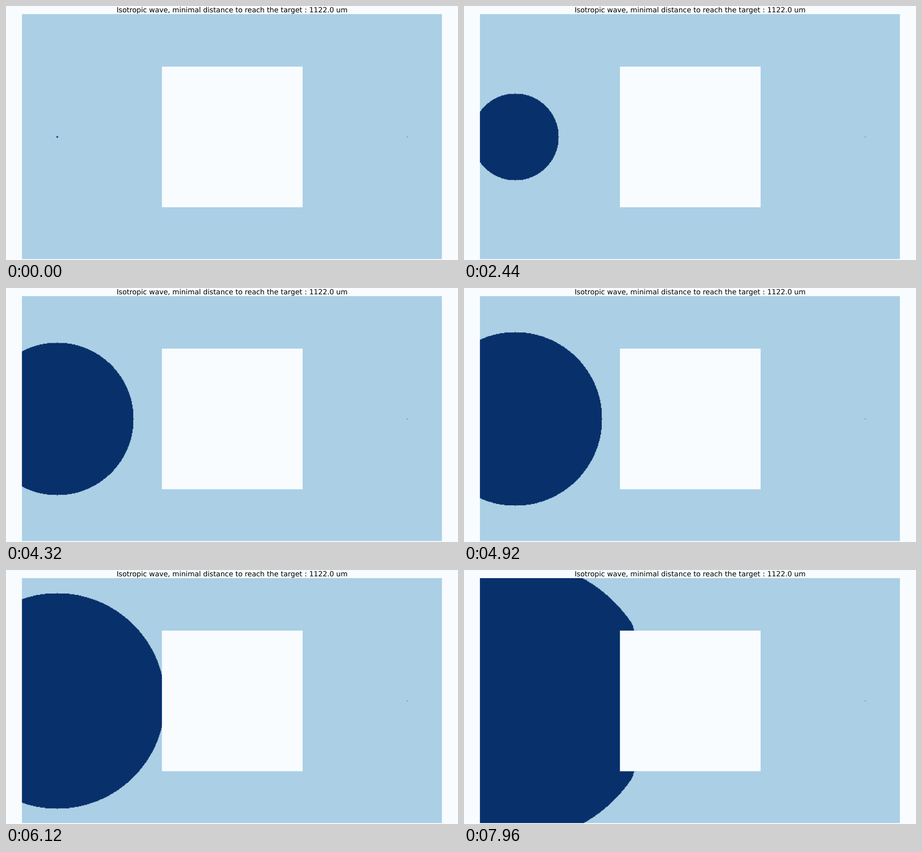
An HTML page for the animation above (8 s loop, 998 by 561 pixels).

```html
<!DOCTYPE html>
<html lang="en">
<head>
<meta charset="utf-8">
<title>Isotropic wave</title>
<style>
  html, body { margin: 0; width: 100%; height: 100%; overflow: hidden; background: #f8fcff; }
  svg { display: block; width: 998px; height: 561px; }
  text { font: 15.65px "DejaVu Sans", sans-serif; text-anchor: middle; text-rendering: geometricPrecision; }
</style>
</head>
<body>
<svg viewBox="0 0 998 561">
  <text x="499.2" y="14">Isotropic wave, minimal distance to reach the target : 1122.0 um</text>
  <!-- one unit is one grid cell -->
  <g transform="translate(35.2 17.95) scale(1.5455)">
    <rect width="600" height="350" fill="#abcfe5"/>
    <rect x="550" y="175" width="1" height="1" fill="#2c6596"/>
    <path id="wave" fill="#08306b"/>
    <rect x="200" y="75" width="201" height="201" fill="#f8fcff"/>
  </g>
</svg>
<script>
  const ROWS = 350, SOURCE = { col: 50, row: 175 };
  const CORNER = { dx: 150, dy: 101 };
  const STEP_MS = 40, STEPS = 200;
  const wave = document.getElementById('wave');
  const cornerDistance = Math.hypot(CORNER.dx, CORNER.dy);

  // Shortest way to a cell; cells in the obstacle's shadow are reached round its corner.
  function distance(dx, dy) {
    const shadowed = dy >= CORNER.dy && dy * CORNER.dx < dx * CORNER.dy;
    return shadowed
      ? cornerDistance + Math.hypot(dx - CORNER.dx, dy - CORNER.dy)
      : Math.hypot(dx, dy);
  }

  function outline(radius) {
    const first = Math.max(0, SOURCE.row - radius);
    const last = Math.min(ROWS - 1, SOURCE.row + radius);
    let right = '', left = '';
    for (let row = first; row <= last; row++) {
      const dy = Math.abs(row - SOURCE.row);
      const reach = Math.floor(Math.sqrt(radius * radius - dy * dy));
      let ahead = reach;
      while (ahead > 0 && distance(ahead, dy) > radius) ahead--;
      const start = Math.max(0, SOURCE.col - reach);
      const end = SOURCE.col + ahead + 1;
      right += `L${end} ${row}V${row + 1}`;
      left = `L${start} ${row + 1}V${row}` + left;
    }
    return `M${SOURCE.col} ${first}${right}${left}Z`;
  }

  let shown = -1;
  function draw(now) {
    const step = Math.floor(Math.max(0, now - begin) / STEP_MS) % STEPS;
    if (step !== shown) {
      wave.setAttribute('d', outline(step + 1));
      shown = step;
    }
    requestAnimationFrame(draw);
  }

  const begin = performance.now();
  draw(begin);
</script>
</body>
</html>
```
